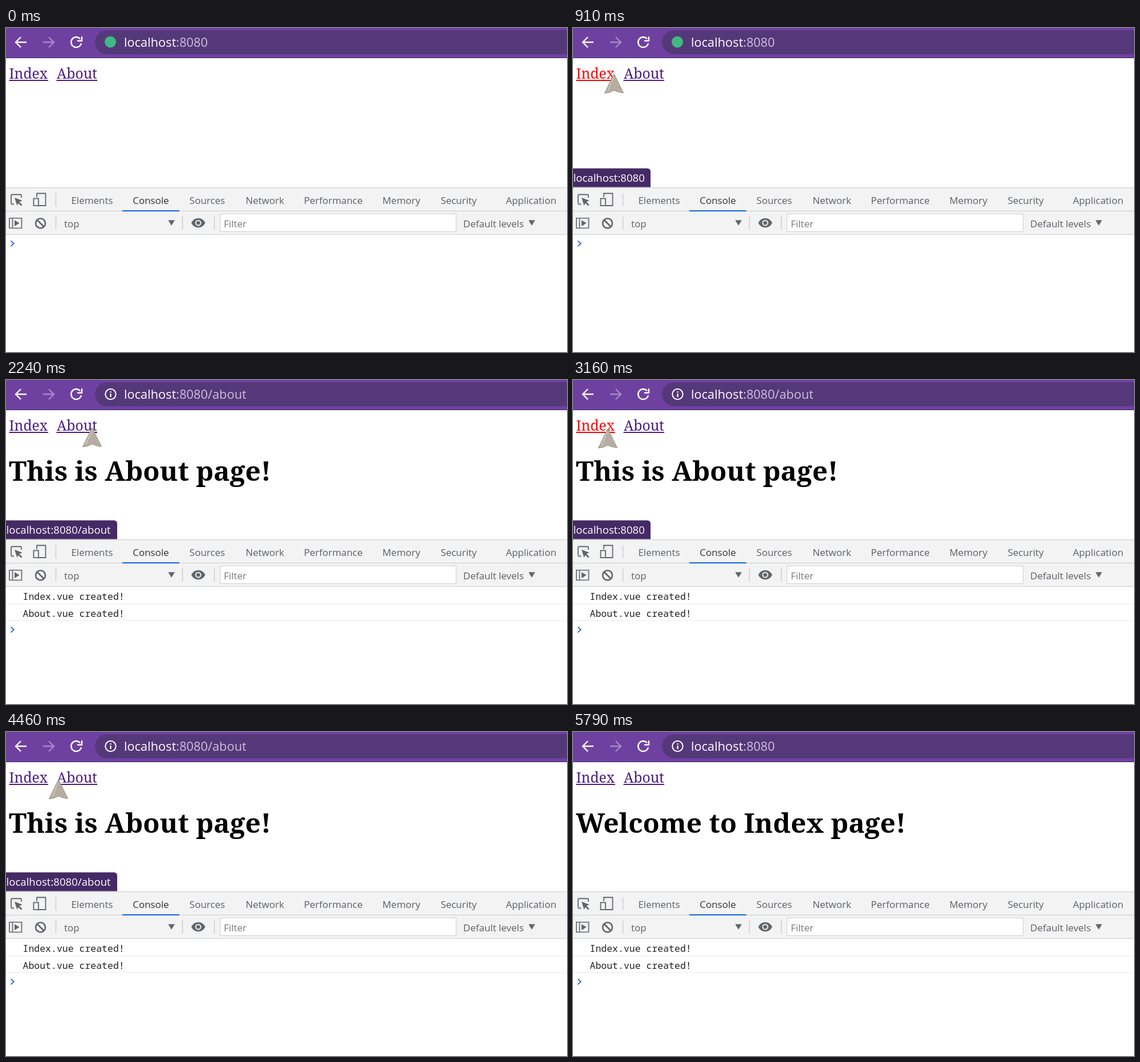
An HTML page that plays this animation: 984 by 569 pixels, repeating every 6260 ms.

```html
<!DOCTYPE html>
<html lang="en">
<head>
<meta charset="utf-8">
<title>Page navigation</title>
<style>
  html, body { margin: 0; width: 100%; height: 100%; overflow: hidden; background: #fff; }
  svg { display: block; width: 100vw; height: 100vh; }
  text { font-family: "Open Sans", "Noto Sans", sans-serif; white-space: pre; }
  .url { font-size: 21.8px; fill: #fff; }
  .dim { fill: #cdc1da; }
  .ui { font-size: 17px; fill: #5a5e63; }
  .link { font: 24.6px "Noto Serif", serif; }
  .head { font: bold 47.8px "Noto Serif", serif; fill: #000; }
  .log { font: 16.5px "Noto Sans Mono", "DejaVu Sans Mono", monospace; fill: #222; }
  .line { fill: none; stroke-width: 2; }
  .icon { stroke: #62666b; }
</style>
</head>
<body>
<svg viewBox="0 0 984 569" preserveAspectRatio="none">
  <rect width="984" height="569" fill="#fff"/>

  <!-- Browser bar -->
  <rect width="984" height="53" fill="#6e41a1"/>
  <rect y="52" width="984" height="1" fill="#4d2d74"/>
  <rect x="156" y="4" width="870" height="42" rx="21" fill="#553879"/>
  <g class="line" style="stroke-width:2.4">
    <path d="M36 25H18M26 16L17 25L26 34" stroke="#fff"/>
    <path d="M65 25H83M75 16L84 25L75 34" stroke="#a78bc6"/>
    <path d="M130 19A9 9 0 1 0 132 27M133 15V22.5H125" stroke="#fff"/>
  </g>
  <circle id="badge" cx="183" cy="24.500" r="10" fill="#41b883"/>
  <g id="info">
    <circle class="line" cx="183.500" cy="25" r="9.200" stroke="#fff"/>
    <path d="M182.500 20h2.200v2.200h-2.200zM182.500 24h2.200v6h-2.200z" fill="#fff"/>
  </g>
  <text class="url" x="207" y="32.500">localhost<tspan class="dim">:8080<tspan id="path"></tspan></tspan></text>

  <!-- Page -->
  <g id="index">
    <text class="link" x="5.500" y="88.500">Index</text>
    <rect x="5.500" y="91" width="68.500" height="2"/>
  </g>
  <g id="about">
    <text class="link" x="89" y="88.500">About</text>
    <rect x="88.500" y="91" width="71.500" height="2"/>
  </g>
  <text id="heading" class="head" x="5" y="177"></text>

  <!-- Status bubble -->
  <g id="bubble">
    <path id="bubbleBox" fill="#452a66"/>
    <text id="bubbleText" x="0.500" y="270" font-size="18.600" fill="#fff"></text>
  </g>

  <!-- Developer tools -->
  <rect y="280" width="984" height="83" fill="#f3f3f3"/>
  <path d="M0 280.500H984M0 321.500H984M0 362.500H984" stroke="#cacccf"/>
  <rect x="204" y="320" width="100" height="2.200" fill="#1a6fe0"/>
  <path d="M87.500 290V313M87.500 331V354M309.500 331V354M365.500 331V354" stroke="#ccc" stroke-width="1.500"/>
  <g class="line icon">
    <path d="M14 309.500H11Q9 309.500 9 307.500V294.500Q9 292.500 11 292.500H25Q27 292.500 27 294.500V298" stroke-width="1.800"/>
    <path d="M54 297V290.500H69.500V312H57" stroke-width="1.800"/>
    <rect x="48.500" y="299.500" width="8.500" height="12.500" stroke-width="1.800"/>
    <path d="M6 334H27.500V351.500H6ZM11.500 334V351.500" stroke-width="1.700"/>
    <circle cx="60.500" cy="343" r="8.500" stroke-width="2.600"/>
    <path d="M54.500 337L66.500 349" stroke-width="2.600"/>
  </g>
  <g fill="#62666b">
    <path d="M15 298L28.500 303L23.500 305.500L28.500 310.500L26.500 312.500L21.500 307.500L19.500 312Z"/>
    <path d="M15 337.500L23.500 342.700L15 348Z"/>
    <path d="M284.500 337.500H296L290.200 347ZM916.500 337.500H928L922.200 347Z"/>
    <path d="M325 342.300Q329 334 337.200 334T349.500 342.300Q345.500 350.600 337.200 350.600T325 342.300Z"/>
    <circle cx="337.200" cy="342.300" r="4.400" fill="none" stroke="#f3f3f3" stroke-width="2"/>
  </g>
  <rect x="375.500" y="326.500" width="414" height="31" fill="#fff" stroke="#cfcfcf"/>
  <g id="tabs" text-anchor="middle"></g>
  <text class="ui" x="102" y="349.500">top</text>
  <text class="ui" x="382" y="350" style="fill:#777">Filter</text>
  <text class="ui" x="802" y="349.500">Default levels</text>

  <!-- Console -->
  <g id="log1">
    <text class="log" x="29.500" y="386">Index.vue created!</text>
    <path d="M0 393.500H984" stroke="#ebebeb"/>
  </g>
  <g id="log2">
    <text class="log" x="29.500" y="416">About.vue created!</text>
    <path d="M0 422.500H984" stroke="#ebebeb"/>
  </g>
  <path id="prompt" class="line" d="M8.500 -4.700L13.700 0L8.500 4.700" stroke="#3a74d8"/>

  <!-- Pointers, both with the tip at the origin -->
  <g id="pointer" stroke="#968d83" stroke-linejoin="round" fill="#b7aea3">
    <g id="hand">
      <path d="M0 0.500L16.500 34L8 32.500L0 29.500L-8 33L-16.500 34.500Z"/>
      <path d="M-1 6L-11 31" stroke="#cbc4ba" stroke-width="2"/>
      <path d="M2 13l1 1M-4 22l1.500 0M5 24l1 1" stroke="#92897e"/>
    </g>
    <g id="arrow">
      <path d="M0.500 0.500L27 14.500L19.500 18.500L27.500 30L24 33.500L15.500 34.500L10.500 25.500L3 30Z"/>
      <path d="M3 5L5 24" stroke="#cbc4ba" stroke-width="2"/>
      <path d="M9 11l1 1M13 18l1.500 0M19 28l1 1" stroke="#92897e"/>
    </g>
  </g>
</svg>
<script>
const LOOP = 6260;
const $ = id => document.getElementById(id);
const show = (id, on) => $(id).setAttribute("display", on ? "inline" : "none");

const tabs = { Elements: 151, Console: 254, Sources: 353, Network: 454,
  Performance: 574, Memory: 693.5, Security: 794, Application: 921 };
for (const [name, x] of Object.entries(tabs)) {
  const tab = document.createElementNS("http://www.w3.org/2000/svg", "text");
  tab.setAttribute("class", "ui");
  tab.setAttribute("x", x);
  tab.setAttribute("y", 308.5);
  if (name === "Console") tab.style.fill = "#333";
  tab.textContent = name;
  $("tabs").append(tab);
}

const power = n => u => u ** n;
const easeOut = u => 1 - (1 - u) ** 1.6;
const smooth = u => u * u * (3 - 2 * u);

// Pointer moves: start, end, number of hops, from, to, easing, optional bend point
const moves = [
  [70, 680, 8, [783, 504], [72, 80], easeOut, [400, 70]],
  [1236, 1830, 8, [72, 80], [151, 83], smooth],
  [2462, 2930, 6, [151, 83], [61, 85], smooth],
  [3460, 3620, 2, [61, 85], [113, 78], power(0.7)],
  [3670, 3850, 2, [113, 78], [133, 79], power(1)],
  [4230, 4630, 5, [133, 79], [70, 85], power(0.85)],
  [5010, 5330, 4, [70, 85], [484, 237], power(2)],
  [5330, 5580, 3, [484, 237], [847, 471], power(0.9)],
  [5580, 5720, 2, [847, 471], [869, 540], power(1)]
];

// State changes: time, value
const pages = [[0, ""], [990, "index"], [2150, "about"], [3240, "index"], [4170, "about"], [5010, "index"]];
const presses = [[0, ""], [910, "index"], [990, ""], [2070, "about"], [2150, ""], [3160, "index"],
  [3240, ""], [4000, "about"], [4170, ""], [4860, "index"], [5010, ""]];
const hints = [[0, "index"], [1530, "about"], [2780, "index"], [3620, "about"], [4630, "index"], [5090, "about"]];
const fades = [[0, 0], [680, 0.35], [750, 0.7], [830, 1], [5640, 0.65], [5720, 0.35], [5790, 0]];
const logs = [[0, 0], [1060, 1], [2240, 2]];
const headings = { "": "", index: "Welcome to Index page!", about: "This is About page!" };

const latest = (list, t) => list.filter(item => item[0] <= t).pop();
const at = (list, t) => latest(list, t)[1];

function pointerAt(t) {
  const [start, end, hops, from, to, ease, bend] = latest(moves, t);
  // The small lead absorbs uneven hop lengths
  const hop = Math.floor((t - start) / (end - start) * hops + 0.15);
  const p = ease(Math.min(1, hop / hops));
  const q = 1 - p;
  return from.map((a, i) => bend
    ? q * q * a + 2 * p * q * bend[i] + p * p * to[i]
    : q * a + p * to[i]);
}

function overLink([x, y]) {
  return y > 64 && y < 98 && (x > 5 && x < 75 || x > 88 && x < 161);
}

function draw(t) {
  const page = at(pages, t);
  const pressed = at(presses, t);
  const count = at(logs, t);

  show("badge", !page);
  show("info", page);
  $("path").textContent = page === "about" ? "/about" : "";
  $("heading").textContent = headings[page];
  for (const id of ["index", "about"]) {
    $(id).setAttribute("fill", pressed === id ? "#f00" : "#4c1a80");
  }

  const away = at(hints, t) === "about";
  const right = away ? 195 : 136;
  $("bubble").setAttribute("opacity", at(fades, t));
  $("bubbleBox").setAttribute("d", `M0 246.500H${right - 6}Q${right} 246.500 ${right} 252.500V279.500H0Z`);
  $("bubbleText").textContent = "localhost:8080" + (away ? "/about" : "");

  show("log1", count > 0);
  show("log2", count > 1);
  $("prompt").setAttribute("transform", `translate(0 ${378.5 + 30 * count})`);

  const visible = t >= 70 && t < 5790;
  show("pointer", visible);
  if (visible) {
    const tip = pointerAt(t);
    const linked = overLink(tip);
    show("hand", linked);
    show("arrow", !linked);
    $("pointer").setAttribute("transform", `translate(${tip.map(Math.round).join(" ")})`);
  }
}

const began = performance.now();
function tick() {
  draw((performance.now() - began) % LOOP);
  requestAnimationFrame(tick);
}
tick();
</script>
</body>
</html>
```
